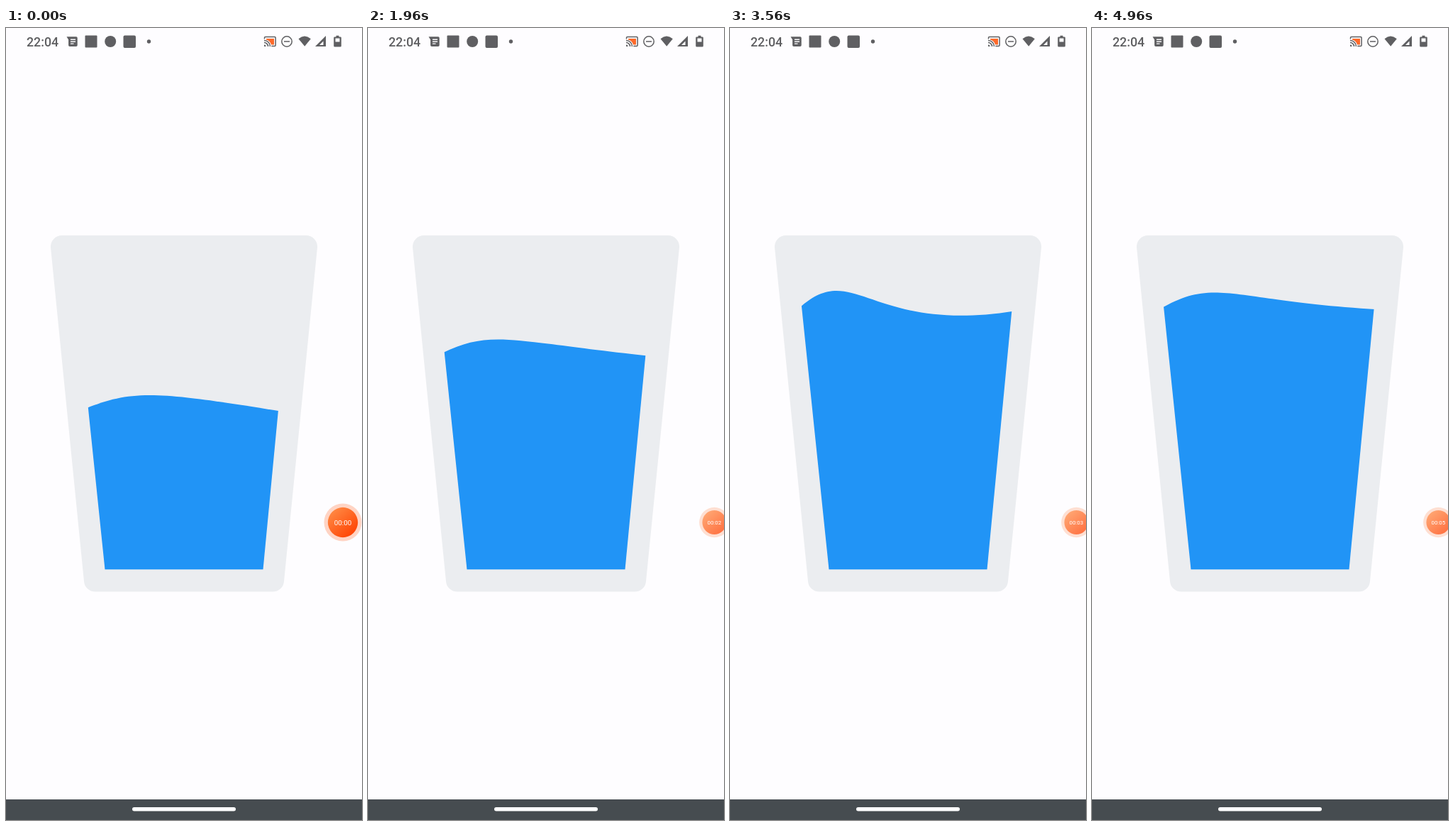
An HTML page for the animation above (5000 ms loop, 502x1115 px).

```html
<!DOCTYPE html>
<html lang="en">
<head>
<meta charset="utf-8">
<title>Filling glass</title>
<style>
  html, body { margin: 0; width: 100%; height: 100%; overflow: hidden; background: #fefdff; }
  svg { display: block; width: 100%; height: 100%; }
  text { font-family: Roboto, "Noto Sans", sans-serif; }
</style>
</head>
<body>
<svg viewBox="0 0 502 1115" xmlns="http://www.w3.org/2000/svg">
  <defs>
    <clipPath id="inside"><path d="M90.6 292H407.5L362.5 762.3H139.5Z"/></clipPath>
    <linearGradient id="ember" x1="0.1" y1="0.1" x2="0.8" y2="0.9">
      <stop offset="0" stop-color="#ff8a45"/>
      <stop offset="1" stop-color="#ff4605"/>
    </linearGradient>
  </defs>
  <rect width="502" height="1115" fill="#fefdff"/>

  <!-- Status bar -->
  <g fill="#5f5f62">
    <text x="29" y="26" font-size="17.8" font-weight="500">22:04</text>
    <path d="M85.5 12.3H99a1.7 1.7 0 0 1 1.7 1.7V24.300a1.700 1.700 0 0 1-1.700 1.700H89.800a1.700 1.700 0 0 1-1.700-1.700V16.500Z"/>
    <path d="M91 16.300H98M91 19.200H98M91 22.100H95.500" stroke="#fefdff" stroke-width="1.400"/>
    <rect x="111.500" y="10.500" width="17" height="17" rx="1"/>
    <circle cx="147.200" cy="19" r="8"/>
    <rect x="165.500" y="10.500" width="17.500" height="17.500" rx="2"/>
    <circle cx="201.500" cy="19" r="2.700"/>
    <path d="M412.500 15.200Q421 8 429.800 15.200L421.200 25.800Z"/>
    <path d="M451 11V26H436Z"/>
    <path d="M447.500 18.500V24H442Z" fill="#fefdff"/>
    <path d="M465.500 10.800h4v1.700h2q1.300 0 1.300 1.300v11.400q0 1.300-1.300 1.300h-8q-1.300 0-1.300-1.300v-11.400q0-1.300 1.300-1.300h2Z"/>
    <rect x="464.500" y="14.500" width="6" height="5" fill="#fefdff"/>
  </g>
  <g fill="none" stroke="#5f5f62" stroke-width="1.500">
    <path d="M364.500 15.500V13.800q0-1.300 1.300-1.300h13q1.300 0 1.300 1.300v10.400q0 1.300-1.300 1.300h-4.500"/>
    <path d="M364 17.500a8.500 8.500 0 0 1 8.500 8.500M364 20.500a5.500 5.500 0 0 1 5.500 5.500"/>
    <circle cx="396" cy="19" r="7.200"/>
    <path d="M392 19H400"/>
  </g>
  <path d="M364 23.500a2.500 2.500 0 0 1 2.500 2.500H364Z" fill="#5f5f62"/>
  <path d="M367 15H378V23.500H374Q372.500 18 367 16.500Z" fill="#ff6a2b"/>

  <!-- Glass and water -->
  <path fill="#ebedf0" d="M79 292H423A16 16 0 0 1 439 309L392 779A15.500 15.500 0 0 1 376.500 793.500H125.500A15.500 15.500 0 0 1 110 779L63 309A16 16 0 0 1 79 292Z"/>
  <g clip-path="url(#inside)"><path id="water" fill="#2194f6"/></g>

  <!-- Timer bubble -->
  <g id="bubble">
    <circle r="26.500" fill="#ff5a14" fill-opacity="0.250"/>
    <circle r="21.200" fill="#fefdff"/>
    <circle id="core" r="21.200" fill="url(#ember)"/>
    <text id="clock" y="3.500" font-size="9.800" fill="#fff" text-anchor="middle">00:00</text>
  </g>

  <!-- Navigation bar -->
  <rect y="1086" width="502" height="29" fill="#464c50"/>
  <rect x="178" y="1097" width="146" height="5.500" rx="2.750" fill="#fff"/>
</svg>
<script>
  const LOOP = 5000;
  const LEFT = 94.4, RIGHT = 407.7, BOTTOM = 764;
  const FILL_END = 4271, FILL_RATE = 0.0409;
  const SWING = 2060, CREST_AT = 1370;
  const FIRST_TICK = 850;
  const DOCK_START = 1720, DOCK_TIME = 200;

  const byId = id => document.getElementById(id);
  const water = byId("water"), bubble = byId("bubble");
  const core = byId("core"), clock = byId("clock");
  const mix = (a, b, k) => a + (b - a) * k;

  // The level rises to its limit, then sinks at the same rate.
  const levelAt = t => 543 - FILL_RATE * (FILL_END - Math.abs(t - FILL_END));

  function waterPath(t) {
    const y = levelAt(t);
    const sway = 0.31 + 0.67 * Math.cos(2 * Math.PI * (t - CREST_AT) / SWING);
    const x1 = mix(LEFT, RIGHT, 0.257), y1 = y - 35 - 45 * sway;
    const x2 = mix(LEFT, RIGHT, 0.318), y2 = y - 33 + 75 * sway;
    return `M${LEFT} ${y}C${x1} ${y1} ${x2} ${y2} ${RIGHT} ${y}V${BOTTOM}H${LEFT}Z`;
  }

  function draw(t) {
    water.setAttribute("d", waterPath(t));

    const k = Math.min(1, Math.max(0, (t - DOCK_START) / DOCK_TIME));
    const dock = k * k * (3 - 2 * k);
    bubble.setAttribute("transform",
      `translate(${mix(475, 488.3, dock)} 696) scale(${mix(1, 0.8, dock)})`);
    core.setAttribute("opacity", mix(1, 0.75, dock));
    bubble.firstElementChild.setAttribute("fill-opacity", mix(0.25, 0.19, dock));

    const seconds = Math.floor((t - FIRST_TICK) / 1000) + 1;
    clock.textContent = "00:0" + seconds;
  }

  const start = performance.now();
  function tick() {
    draw((performance.now() - start) % LOOP);
    requestAnimationFrame(tick);
  }
  draw(0);
  requestAnimationFrame(tick);
</script>
</body>
</html>
```
